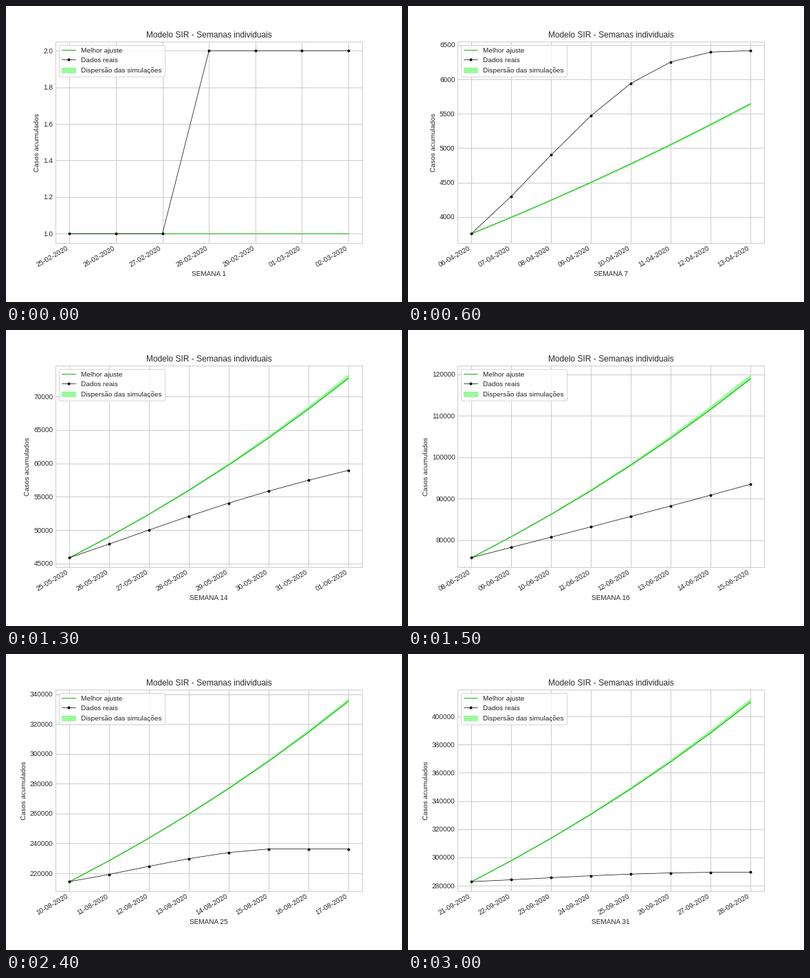
A matplotlib script for the animation above (3.1 s loop, 576 by 432 pixels).

```python
import numpy as np
import matplotlib.pyplot as plt
from matplotlib.animation import FuncAnimation
from matplotlib.lines import Line2D
from matplotlib.patches import Patch

WEEKS = 31
INK, GRID = "0.15", "0.8"
FIT, BAND = "#00a800", "palegreen"

plt.rcParams.update({
    "font.family": "Liberation Sans",
    "font.size": 10,
    "text.hinting": "native",
    "text.color": INK,
    "axes.labelcolor": INK,
    "axes.edgecolor": GRID,
    "axes.linewidth": 1,
    "axes.titlesize": 12,
    "axes.grid": True,
    "axes.axisbelow": True,
    "grid.color": GRID,
    "grid.linewidth": 1,
    "xtick.color": INK,
    "ytick.color": INK,
    "xtick.major.size": 0,
    "ytick.major.size": 0,
    "lines.solid_capstyle": "round",
})

# Key weeks: first and last case count, growth of the fit,
# relative spread of the simulations, bow of the real curve
KEYS = np.array([
    (1, 1, 2, 1.000, 0, 0),
    (7, 3755, 6418, 1.504, -0.003, 0.25),
    (11, 20080, 27785, 1.609, 0.0055, 0.15),
    (16, 75750, 93470, 1.570, 0.0085, -0.01),
    (20, 140350, 154050, 1.498, 0.007, 0.09),
    (25, 214400, 236290, 1.564, 0.005, 0.32),
    (31, 282820, 289600, 1.450, 0.006, 0.22),
])
KEY_WEEKS = KEYS[:, 0]
EDGE_WEEKS = np.column_stack([KEY_WEEKS, KEY_WEEKS + 1]).ravel()
EDGE_LOGS = np.log(KEYS[:, 1:3]).ravel()


def week_start(week):
    return np.exp(np.interp(week, EDGE_WEEKS, EDGE_LOGS))


def real_cases(week, t, bow):
    first, last = week_start(week), week_start(week + 1)
    share = np.minimum(t + bow * np.sin(np.pi * t ** 1.3), 1)
    return np.round(first + (last - first) * share)


def best_fit(week, t, first, growth):
    bend = 0.44 * min(1, 0.2 + 0.06 * week)
    return first * (1 + (growth - 1) * np.expm1(bend * t) / np.expm1(bend))


def week_dates(week):
    if week == 1:
        days = np.datetime64("2020-02-25") + np.arange(7)
    else:
        days = np.datetime64("2020-03-02") + 7 * (week - 2) + np.arange(8)
    return ["-".join(reversed(str(d).split("-"))) for d in days]


fig, ax = plt.subplots(figsize=(8, 6), dpi=72, facecolor="white")
fig.subplots_adjust(left=0.125, right=0.9, bottom=0.2, top=0.88)

real_style = dict(color="black", lw=0.7, marker=".", ms=6)
fit_style = dict(color=FIT, lw=0.9)
handles = [
    Line2D([], [], label="Melhor ajuste", **fit_style),
    Line2D([], [], label="Dados reais", **real_style),
    Patch(color=BAND, label="Dispersão das simulações"),
]


def draw(frame):
    week = frame + 1
    dates = week_dates(week)
    x = np.arange(len(dates))
    t = x / x[-1]
    growth, spread, bow = (np.interp(week, KEY_WEEKS, column)
                           for column in KEYS[:, 3:].T)
    cases = real_cases(week, t, bow)
    fit = best_fit(week, t, cases[0], growth)

    ax.clear()
    ax.fill_between(x, fit, fit * (1 + spread * t), color=BAND)
    ax.plot(x, fit, **fit_style)
    ax.plot(x, cases, **real_style)
    ax.set_xticks(x)
    ax.set_xticklabels(dates, rotation=30, ha="right")
    ax.set_title("Modelo SIR - Semanas individuais")
    ax.set_xlabel(f"SEMANA {week}")
    ax.set_ylabel("Casos acumulados")
    ax.legend(handles=handles, loc="upper left", frameon=True)


anim = FuncAnimation(fig, draw, frames=WEEKS, interval=100,
                     repeat=True, repeat_delay=0)
plt.show()
```
